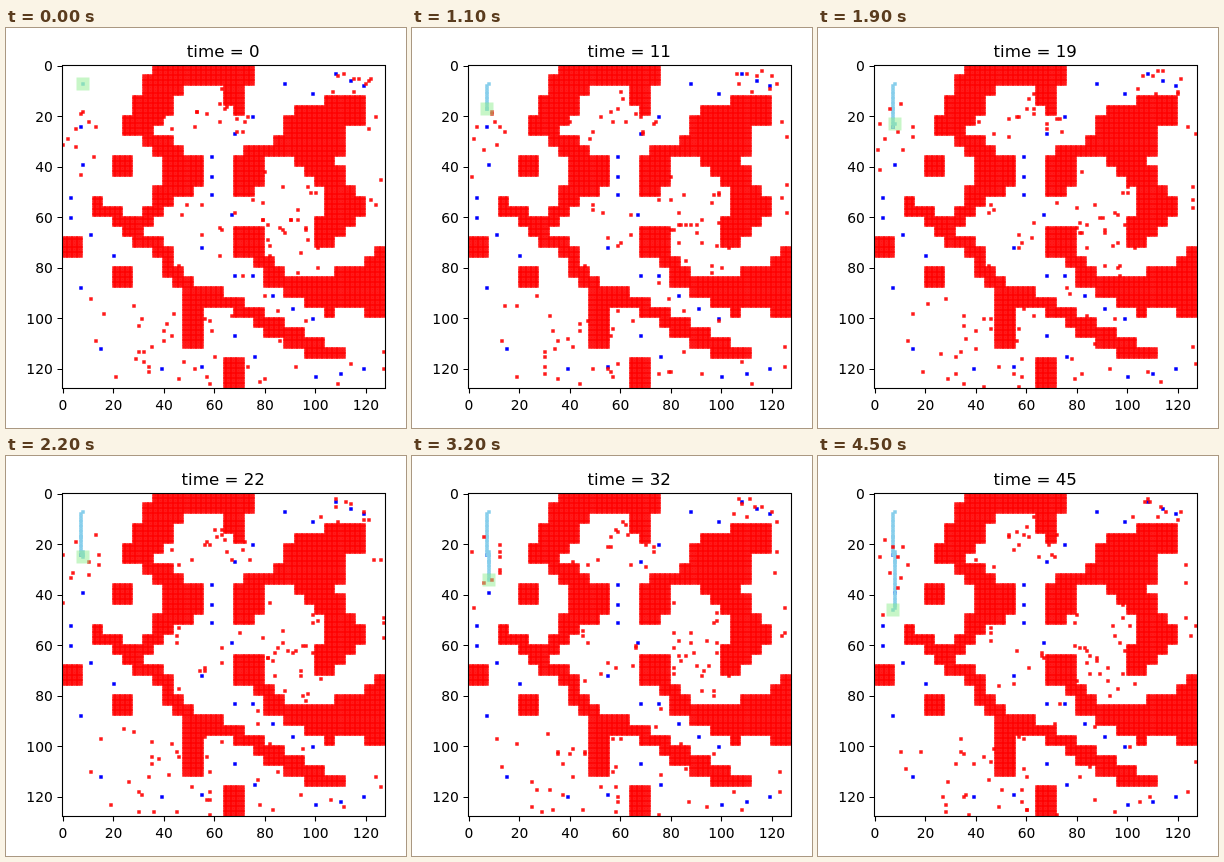
Animation of 400 by 400 pixels, one loop 4600 ms. Source, as an HTML page with a canvas:

```html
<!DOCTYPE html>
<html lang="en">
<head>
<meta charset="utf-8">
<title>Path through moving obstacles</title>
<style>
  html, body { margin: 0; width: 100%; height: 100%; overflow: hidden; background: #fff; }
  canvas, svg { position: absolute; left: 0; top: 0; width: 400px; height: 400px; }
  text { font-family: "DejaVu Sans", sans-serif; font-size: 13.89px; }
  #title { font-size: 16.67px; }
</style>
</head>
<body>
<canvas id="plot" width="400" height="400"></canvas>
<svg id="axes" viewBox="0 0 400 400">
  <rect x="56.5" y="37.5" width="323" height="323" fill="none" stroke="#000" stroke-width="1.11"/>
  <text id="title" x="217.2" y="29" text-anchor="middle">time = 0</text>
</svg>
<script>
const STEPS = 46, STEP_MS = 100;
const LEFT = 56, TOP = 37, SIDE = 323.2, CELL = SIDE / 128;
const px = x => LEFT + (x + 0.5) * CELL;
const py = y => TOP + (y + 0.5) * CELL;

// Value of keys [at, a, b] at t, linear between neighbours and rounded
function sample(keys, t) {
  const i = Math.max(1, keys.findIndex(k => k[0] >= t));
  const [t0, a0, b0] = keys[i - 1], [t1, a1, b1] = keys[i];
  const k = (t - t0) / (t1 - t0);
  return [Math.round(a0 + (a1 - a0) * k), Math.round(b0 + (b1 - b0) * k)];
}

// Walls live on a 32 x 32 grid; a band follows its first and last column from row to row.
const walls = new Set();
function band(...keys) {
  for (let row = keys[0][0]; row <= keys[keys.length - 1][0]; row++) {
    const [first, last] = sample(keys, row);
    for (let col = first; col <= last; col++) walls.add(row * 32 + col);
  }
}
const block = (row, col, h, w) => band([row, col, col + w - 1], [row + h - 1, col, col + w - 1]);

band([0, 9, 18], [1, 8, 18], [2, 8, 11], [5, 6, 9], [6, 6, 8], [7, 8, 10], [9, 10, 12.9],
  [11, 10, 13], [12, 9, 12], [14, 8, 8.9], [15, 7, 8]);
band([13, 3, 3], [14, 3, 5], [15, 5, 8], [16, 6, 7], [18, 8.9, 10], [19, 10, 10],
  [21, 10.9, 12], [22, 12, 15], [23, 12, 17], [24, 17, 19], [28, 23.9, 27]);
band([3, 26, 29], [4, 23, 29], [5, 22, 29], [6, 22, 27], [7, 21, 27], [8, 18, 27],
  [9, 23, 26], [11, 25, 27], [13, 26, 29], [14, 26, 29], [15, 25, 28], [17, 25, 26]);
band([16, 17, 19], [18, 17, 19], [20, 20, 21], [21, 20, 31], [22, 22, 31], [24, 26, 26]);
band([18, 31, 31], [19, 30, 31], [20, 27, 31]);
band([2, 16, 17], [3, 16, 17], [4, 17, 17]);
band([9, 17, 19], [11, 17, 19], [12, 17, 18]);
block(9, 5, 2, 2);
block(20, 5, 2, 2);
block(17, 0, 2, 2);
block(23, 30, 2, 2);
block(24, 12, 4, 2);
block(29, 16, 3, 2);

const isWall = (x, y) => walls.has((y >> 2) * 32 + (x >> 2));

// Fixed posts stand evenly along short lines.
const posts = [];
function row(n, x0, y0, x1, y1) {
  for (let i = 0; i < n; i++) {
    const k = i / (n - 1);
    posts.push([Math.round(x0 + (x1 - x0) * k), Math.round(y0 + (y1 - y0) * k)]);
  }
}
row(3, 59, 36, 59, 51);
row(2, 7, 24, 8, 39);
row(2, 3, 52, 3, 60);
row(2, 11, 67, 20, 75);
row(2, 7, 88, 15, 112);
row(2, 75, 20, 68, 27);
row(2, 67, 59, 55, 72);
row(2, 68, 83, 75, 83);
row(3, 83, 91, 99, 100);
row(2, 68, 107, 76, 115);
row(2, 39, 120, 55, 119);
row(3, 100, 123, 119, 120);
row(2, 88, 7, 99, 11);
row(3, 108, 3, 119, 8);

// Agent route: step, x, y
const route = [[0, 8, 7], [1, 7, 8], [10, 7, 17], [11, 7, 17], [18, 7, 24], [19, 8, 23],
  [26, 8, 28], [39, 8, 41], [45, 7.4, 46]];
const trail = Array.from({ length: STEPS }, (_, t) => sample(route, t));

let seed = 4127;
function random() {
  seed = (seed * 1664525 + 1013904223) % 4294967296;
  return seed / 4294967296;
}
const between = (a, b) => a + Math.floor(random() * (b - a + 1));

// Wanderers take one random step at a time and stay in their open area.
const walkers = [];
function roam(count, x0, y0, x1, y1) {
  const open = (x, y) => x >= x0 && x <= x1 && y >= y0 && y <= y1 && !isWall(x, y);
  while (count--) {
    let x, y;
    do { x = between(x0, x1); y = between(y0, y1); } while (!open(x, y));
    walkers.push(Array.from({ length: STEPS }, () => {
      const here = [x, y], nx = x + between(-1, 1), ny = y + between(-1, 1);
      if (open(nx, ny)) [x, y] = [nx, ny];
      return here;
    }));
  }
}
roam(16, 40, 8, 74, 29);
roam(22, 79, 42, 103, 80);
roam(28, 10, 88, 60, 127);
roam(9, 92, 2, 122, 12);
roam(10, 0, 0, 15, 50);
roam(18, 45, 48, 100, 102);
roam(10, 62, 98, 127, 127);
roam(5, 120, 15, 127, 65);

function dot(ctx, color, [x, y], alpha) {
  ctx.globalAlpha = alpha;
  ctx.fillStyle = color;
  ctx.fillRect(Math.round(px(x)) - 1.75, Math.round(py(y)) - 1.75, 3.5, 3.5);
}

const still = document.createElement("canvas");
still.width = still.height = 400;
const base = still.getContext("2d");
for (let y = 0; y < 128; y++) {
  for (let x = 0; x < 128; x++) if (isWall(x, y)) dot(base, "#f00", [x, y], 0.9);
}
posts.forEach(p => dot(base, "#00f", p, 1));

const axes = document.getElementById("axes"), title = document.getElementById("title");
function add(tag, attrs, label = "") {
  const el = document.createElementNS("http://www.w3.org/2000/svg", tag);
  for (const key in attrs) el.setAttribute(key, attrs[key]);
  el.textContent = label;
  axes.append(el);
}
for (let v = 0; v <= 120; v += 20) {
  const x = Math.floor(px(v)) + 0.5, y = Math.floor(py(v)) + 0.5;
  add("path", { d: `M${x} 360.5v5M56.5 ${y}h-5`, stroke: "#000", "stroke-width": 1.11 });
  add("text", { x: px(v) - 0.3, y: 382, "text-anchor": "middle" }, v);
  add("text", { x: 46.8, y: Math.round(py(v) + 5.2), "text-anchor": "end" }, v);
}

const ctx = document.getElementById("plot").getContext("2d");
function draw(t) {
  ctx.globalAlpha = 1;
  ctx.fillStyle = "#fff";
  ctx.fillRect(0, 0, 400, 400);
  ctx.save();
  ctx.beginPath();
  ctx.rect(56.5, 37.5, 323, 323);
  ctx.clip();
  ctx.drawImage(still, 0, 0);
  trail.slice(0, t + 1).forEach(p => dot(ctx, "#87ceeb", p, 1));
  walkers.forEach(w => dot(ctx, "#f00", w[t], 0.9));
  const [x, y] = trail[t];
  ctx.globalAlpha = 0.5;
  ctx.fillStyle = "#90ee90";
  ctx.fillRect(Math.round(px(x)) - 6.5, Math.round(py(y)) - 6.5, 13, 13);
  ctx.restore();
  title.textContent = "time = " + t;
}

const start = performance.now();
let shown = -1;
function tick() {
  const t = Math.floor((performance.now() - start) / STEP_MS) % STEPS;
  if (t !== shown) draw(shown = t);
  requestAnimationFrame(tick);
}
tick();
</script>
</body>
</html>
```
